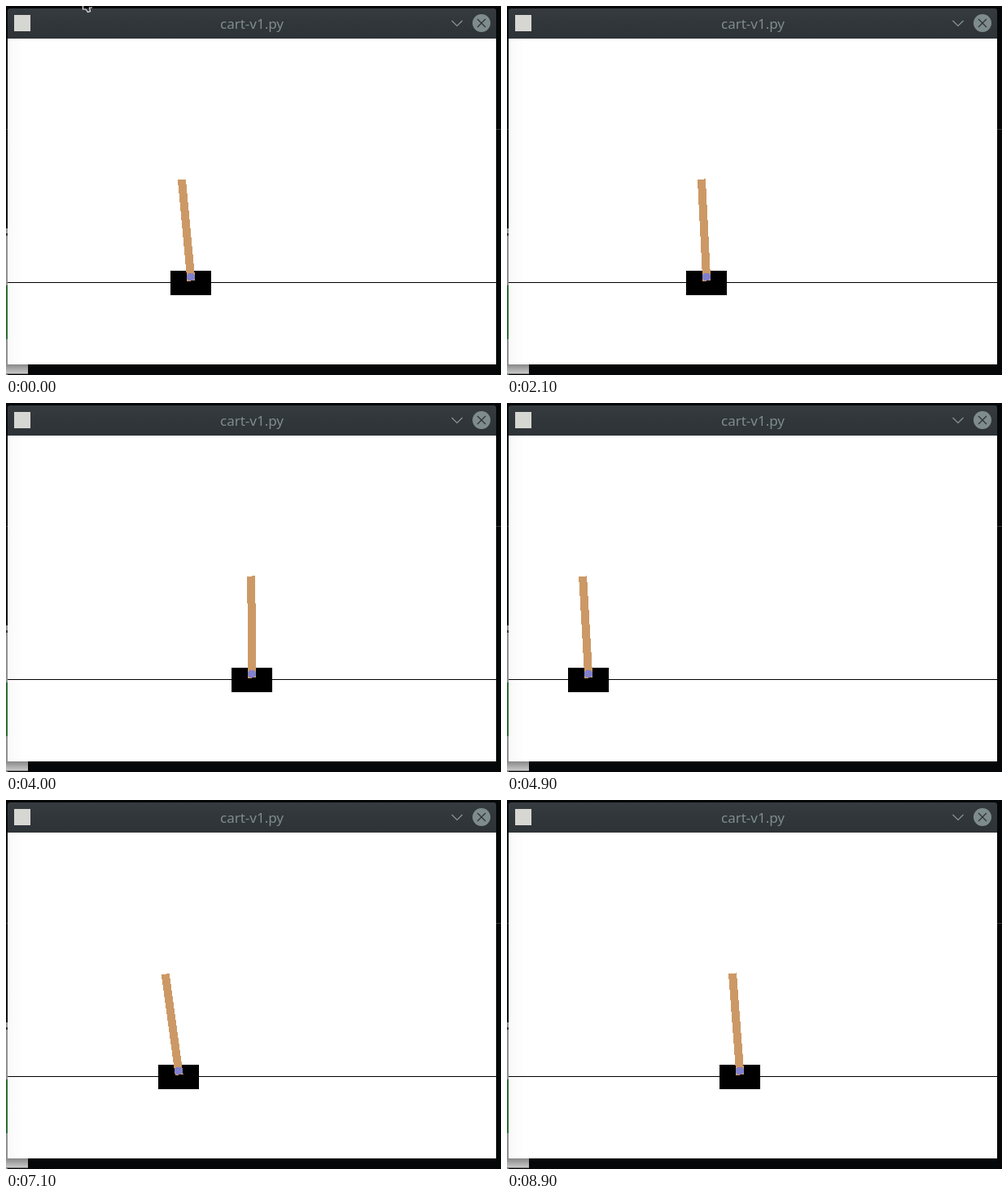
Animation of 608x453 px, one loop 9000 ms. Source, as an HTML page with a canvas:

```html
<!DOCTYPE html>
<html lang="en">
<head>
<meta charset="utf-8">
<title>cart-v1.py</title>
<style>
html, body { margin: 0; width: 100%; height: 100%; overflow: hidden; background: #000; }
canvas { display: block; width: 608px; height: 453px; }
</style>
</head>
<body>
<canvas id="stage" width="608" height="453"></canvas>
<script>
const ctx = document.getElementById('stage').getContext('2d');
const STEP = 100, LOOP = 9000, CURSOR_END = 1500;
const START_X = 303, POWER = 2.2;
const BASE_Y = 340, PIVOT_Y = 332.5;

// Every run speeds up leftwards from START_X and passes one key pose
const runs = [
  { start: -10, key: 0, x: 227, tilt: -5.3 },
  { start: 3, key: 12, x: 87, tilt: -3.4 },
  { start: 13, key: 21, x: 245, tilt: -2.9 },
  { start: 28, key: 32, x: 268, tilt: -3.3 },
  { start: 39, key: 49, x: 100, tilt: -3.3 },
  { start: 51, key: 60, x: 259, tilt: 0 },
  { start: 63, key: 71, x: 212, tilt: -7.8 },
  { start: 72, key: 84, x: 195, tilt: -5 },
  { start: 85, key: 89, x: 286, tilt: -4.3 }
];

function pose(step) {
  const run = runs.findLast(r => r.start <= step);
  const u = (step - run.start) / (run.key - run.start);
  return {
    x: Math.round(START_X + (run.x - START_X) * u ** POWER),
    tilt: run.tilt * Math.min(1, u) * Math.PI / 180
  };
}

function rect(color, x, y, w, h) {
  ctx.fillStyle = color;
  ctx.fillRect(x, y, w, h);
}

function gradient(x0, y0, x1, y1, ...colors) {
  const g = ctx.createLinearGradient(x0, y0, x1, y1);
  colors.forEach((c, i) => g.addColorStop(i / (colors.length - 1), c));
  return g;
}

function path(points, color, width) {
  ctx.beginPath();
  points.forEach(([x, y]) => ctx.lineTo(x, y));
  ctx.strokeStyle = color;
  ctx.lineWidth = width;
  ctx.stroke();
}

function drawDesktop() {
  rect('#060708', 0, 0, 608, 453);
  rect('#35383a', 0, 151, 608, 1);
  rect('#909090', 0, 273, 2, 180);
  rect('#333', 0, 279, 2, 3);
  rect('#2c6e34', 0, 343, 2, 66);
  rect(gradient(0, 440, 0, 451, '#888', '#c8c8c8'), 0, 440, 27, 11);
  rect('#777', 0, 451, 27, 1);
}

function drawTitleBar() {
  ctx.fillStyle = gradient(0, 3, 0, 40, '#363b40', '#31363b', '#2e3338');
  ctx.beginPath();
  ctx.roundRect(2, 3, 600, 37, [3, 3, 0, 0]);
  ctx.fill();
  rect('#d6d6d2', 10, 11, 20, 20);

  ctx.fillStyle = '#7f8c8d';
  ctx.font = '17px "Noto Sans", sans-serif';
  ctx.textAlign = 'center';
  ctx.fillText('cart-v1.py', 302, 28);

  path([[547.5, 18], [554, 24.5], [560.5, 18]], '#8b9596', 1.2);
  ctx.fillStyle = '#7f8c8d';
  ctx.beginPath();
  ctx.arc(584, 21, 11, 0, 2 * Math.PI);
  ctx.fill();
  path([[579, 16], [589, 26]], '#2e3338', 1.3);
  path([[589, 16], [579, 26]], '#2e3338', 1.3);
}

function drawCursor() {
  path([[94.5, -1], [94.5, 4], [98, 4], [100.5, 7.5], [103.5, 6.5],
    [102.5, 2], [106, 2]], '#e8e8e8', 1.2);
}

// Hard-edged, without antialiasing
function drawPole(cx, tilt) {
  const sin = Math.sin(tilt), cos = Math.cos(tilt);
  for (let y = 205; y < 340; y++) {
    for (let x = cx - 35; x < cx + 35; x++) {
      const dx = x + 0.5 - cx, dy = y + 0.5 - PIVOT_Y;
      const across = dx * cos + dy * sin, along = dy * cos - dx * sin;
      if (Math.hypot(dx, dy) <= 5) rect('#8080cc', x, y, 1, 1);
      else if (Math.abs(across) <= 5 && along >= -120 && along <= 5) rect('#cc9966', x, y, 1, 1);
    }
  }
}

function draw(t) {
  drawDesktop();
  drawTitleBar();
  if (t < CURSOR_END) drawCursor();
  rect('#fff', 2, 40, 600, 400);
  rect(gradient(2, 0, 22, 0, '#f9f9f9', '#fff'), 2, 40, 20, 400);
  rect('#000', 2, 339, 600, 1);
  const { x, tilt } = pose(Math.floor(t / STEP));
  rect('#000', x - 25, BASE_Y - 15, 50, 30);
  drawPole(x, tilt);
}

const start = performance.now();
function tick() {
  draw((performance.now() - start) % LOOP);
  requestAnimationFrame(tick);
}
tick();
</script>
</body>
</html>
```
